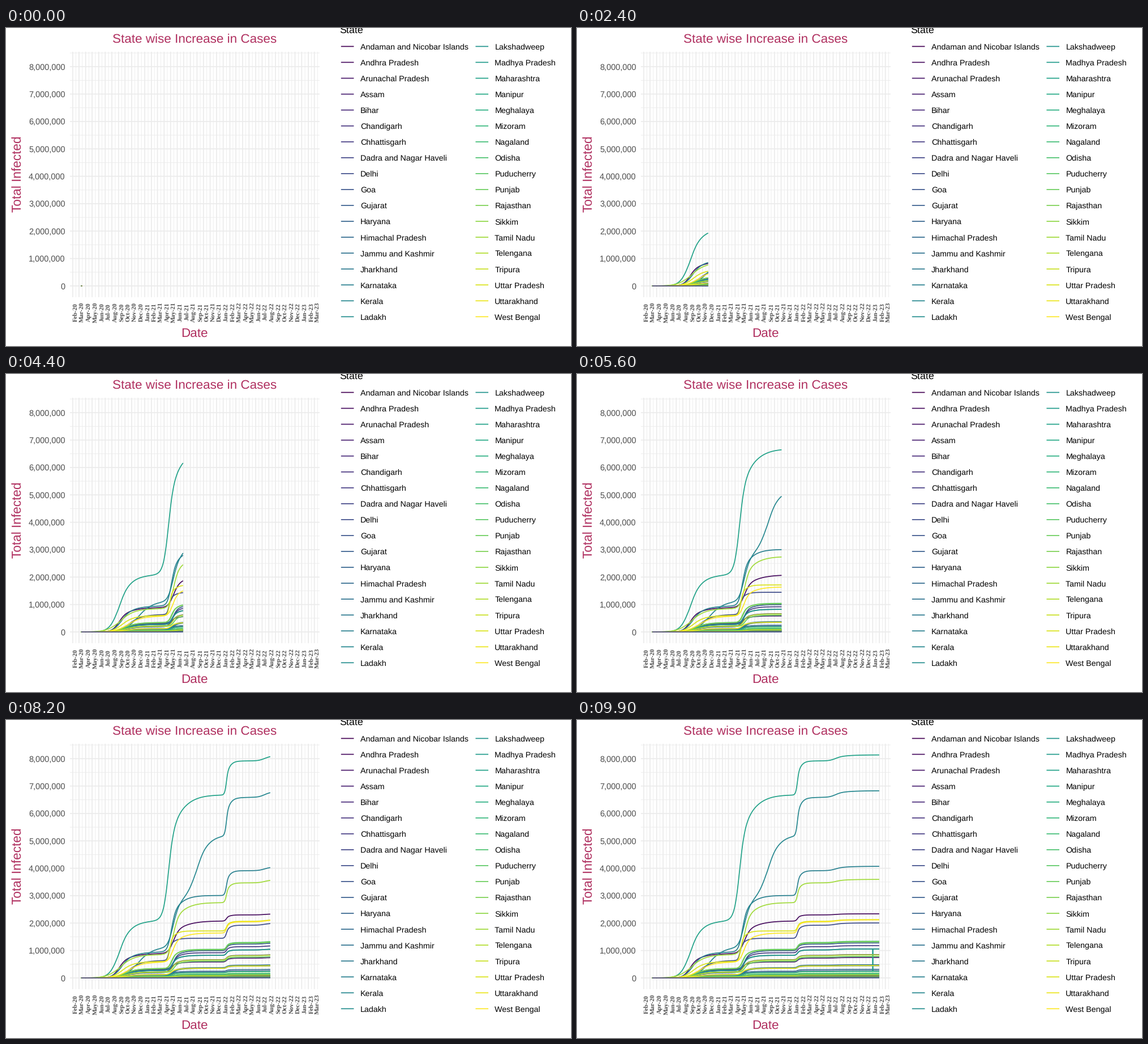
A matplotlib script for the animation above (10 s loop, 998 by 561 pixels).

```python
import numpy as np
import matplotlib.pyplot as plt
from matplotlib.animation import FuncAnimation
from matplotlib.collections import LineCollection

W, H, DPI = 998, 561, 100
FRAMES, INTERVAL = 100, 100
SANS, SERIF = "Liberation Sans", "Liberation Serif"
MAROON, GREY, GRID = "#B03060", "#4D4D4D", "#EBEBEB"
LINE = 1.7

LEFT, RIGHT, TOP, BOTTOM = 112.4, 553.4, 41.9, 474.9
X_START, X_END = 132.4, 533.4
Y_ZERO, Y_MILLION = 455, 48.35

plt.rcParams["text.hinting"] = "none"
rng = np.random.default_rng(4)

# thousands of cases at the end
TOTALS = {
    "Andaman and Nicobar Islands": 11, "Andhra Pradesh": 2339,
    "Arunachal Pradesh": 67, "Assam": 746, "Bihar": 851, "Chandigarh": 99,
    "Chhattisgarh": 1178, "Dadra and Nagar Haveli": 12, "Delhi": 2007,
    "Goa": 259, "Gujarat": 1277, "Haryana": 1057, "Himachal Pradesh": 313,
    "Jammu and Kashmir": 479, "Jharkhand": 443, "Karnataka": 4072,
    "Kerala": 6828, "Ladakh": 29, "Lakshadweep": 11, "Madhya Pradesh": 1055,
    "Maharashtra": 8137, "Manipur": 140, "Meghalaya": 97, "Mizoram": 239,
    "Nagaland": 36, "Odisha": 1337, "Puducherry": 176, "Punjab": 785,
    "Rajasthan": 1316, "Sikkim": 44, "Tamil Nadu": 3595, "Telengana": 841,
    "Tripura": 108, "Uttar Pradesh": 2128, "Uttarakhand": 449,
    "West Bengal": 2118,
}

# waves of the largest states: level reached, middle month, width
WAVES = {
    "Andhra Pradesh": [(890, 7.0, 0.5), (2078, 15.4, 0.4)],
    "Delhi": [(640, 8.3, 0.8), (1445, 14.75, 0.16)],
    "Karnataka": [(950, 7.3, 0.6), (3008, 15.1, 0.3)],
    "Kerala": [(1120, 9.5, 0.95), (3150, 15.35, 0.4), (5250, 18.8, 0.65)],
    "Maharashtra": [(2100, 6.9, 0.65), (6680, 14.65, 0.4)],
    "Tamil Nadu": [(850, 6.9, 0.9), (2748, 15.4, 0.35)],
    "Uttar Pradesh": [(603, 7.3, 0.7), (1713, 14.85, 0.16)],
    "West Bengal": [(580, 8.1, 0.9), (1640, 15.3, 0.33)],
}
NAMES = list(TOTALS)
COLORS = plt.get_cmap("viridis")(np.linspace(0, 1, len(NAMES)))

# calendar: months counted from February 2020
MONTHS = np.arange("2020-02", "2023-04", dtype="M8[M]")
MONTH_DAY = (MONTHS.astype("M8[D]") - np.datetime64("2020-02-01")).astype(int)
MONTH_X = 117.4 + 0.3797 * MONTH_DAY

XS = np.linspace(X_START, X_END, 1057)
TIME = np.interp(XS, MONTH_X, np.arange(len(MONTHS)))


def wave(mid, width):
    """Rise from 0 to 1: a steep logistic climb, then a slow tail."""
    t = TIME - mid
    u = np.maximum(t, 0) / min(3 * width, 1.2)
    climb = 1 / (1 + np.exp(-t / width))
    return 0.75 * climb + 0.25 * (1 - (1 + u) * np.exp(-u))


def growth(name):
    total = TOTALS[name]
    lag = rng.uniform(-0.1, 0.5)
    steps = WAVES.get(name, [(0.26 * total, 7.6, 0.75),
                             (0.78 * total, 15 + lag, 0.25)])
    last = steps[-1][0]
    peak = last + 0.85 * (total - last)
    y, level = 0, 0
    for top, mid, width in steps + [(peak, 23.47, 0.13), (total, 29.3, 0.45)]:
        y = y + (top - level) * wave(mid, width)
        level = top
    return y


cases = {name: growth(name) for name in NAMES}
# one day with a wrong report
cases["Madhya Pradesh"][np.searchsorted(XS, 522)] = 240

fig = plt.figure(figsize=(W / DPI, H / DPI), dpi=DPI, facecolor="white")
ax = fig.add_axes([0, 0, 1, 1])
ax.set_xlim(-0.5, W - 0.5)
ax.set_ylim(H, 0)
ax.axis("off")


def px(size):
    return size * 72 / DPI


def to_y(millions):
    return Y_ZERO - Y_MILLION * millions


def label(x, y, text, size, color="black", ha="left", **kw):
    kw.setdefault("family", SANS)
    ax.text(x, y, text, fontsize=px(size), color=color, ha=ha, va="baseline",
            rotation_mode="anchor", **kw)


def lines(segments, color, width, z):
    group = LineCollection(segments, colors=color, linewidths=px(width),
                           capstyle="butt", zorder=z, snap=False)
    ax.add_collection(group, autolim=False)
    return group


def grid(xs, ys, width, z):
    lines([[(x, TOP), (x, BOTTOM)] for x in xs]
          + [[(LEFT, y), (RIGHT, y)] for y in ys], GRID, width, z)


# panel
mid_x = np.append((MONTH_X[1:] + MONTH_X[:-1]) / 2, MONTH_X[-1] + 5.8)
grid(mid_x, to_y(np.arange(0.5, 9)), LINE / 2, 1)
grid(MONTH_X, to_y(np.arange(9)), LINE, 2)

for m in range(9):
    label(104, to_y(m) + 5.4, f"{m * 1000000:,}", 14.5, GREY, "right")
for i, (x, month) in enumerate(zip(MONTH_X, MONTHS.astype(object))):
    label(x + 8.2, 501.5, f"{month:%b-%y}", 11.1, GREY, "center",
          family=SERIF, weight="bold", rotation=90)

label(332.6, 26.5, "State wise Increase in Cases", 22.5, MAROON, "center")
label(332.4, 544.6, "Date", 22.5, MAROON, "center")
label(25.8, 257.8, "Total Infected", 22.6, MAROON, "center", rotation=90)

# legend
label(588.6, 8.4, "State", 17.9)
keys = []
for i, name in enumerate(NAMES):
    col, row = divmod(i, 18)
    x, y = 591.3 + 237.6 * col, 32.5 + 28.05 * row
    keys.append([(x, y), (x + 22.6, y)])
    label(x + 34, y + 5.4, name, 14.3)
lines(keys, COLORS, LINE, 3)

# the flattest curve lies on top
order = sorted(range(len(NAMES)), key=lambda i: NAMES[i].startswith("Dadra"))
paths = [to_y(cases[NAMES[i]] / 1000) for i in order]
curves = lines([], COLORS[order], LINE, 4)


def update(k):
    end = min(133.8 + 4.055 * k, X_END)
    n = np.searchsorted(XS, end)
    x = np.append(XS[:n], end)
    curves.set_segments([np.column_stack([x, np.append(y[:n], np.interp(end, XS, y))])
                         for y in paths])
    return [curves]


anim = FuncAnimation(fig, update, frames=FRAMES, interval=INTERVAL, repeat=True,
                     repeat_delay=0, init_func=lambda: update(0))
plt.show()
```
